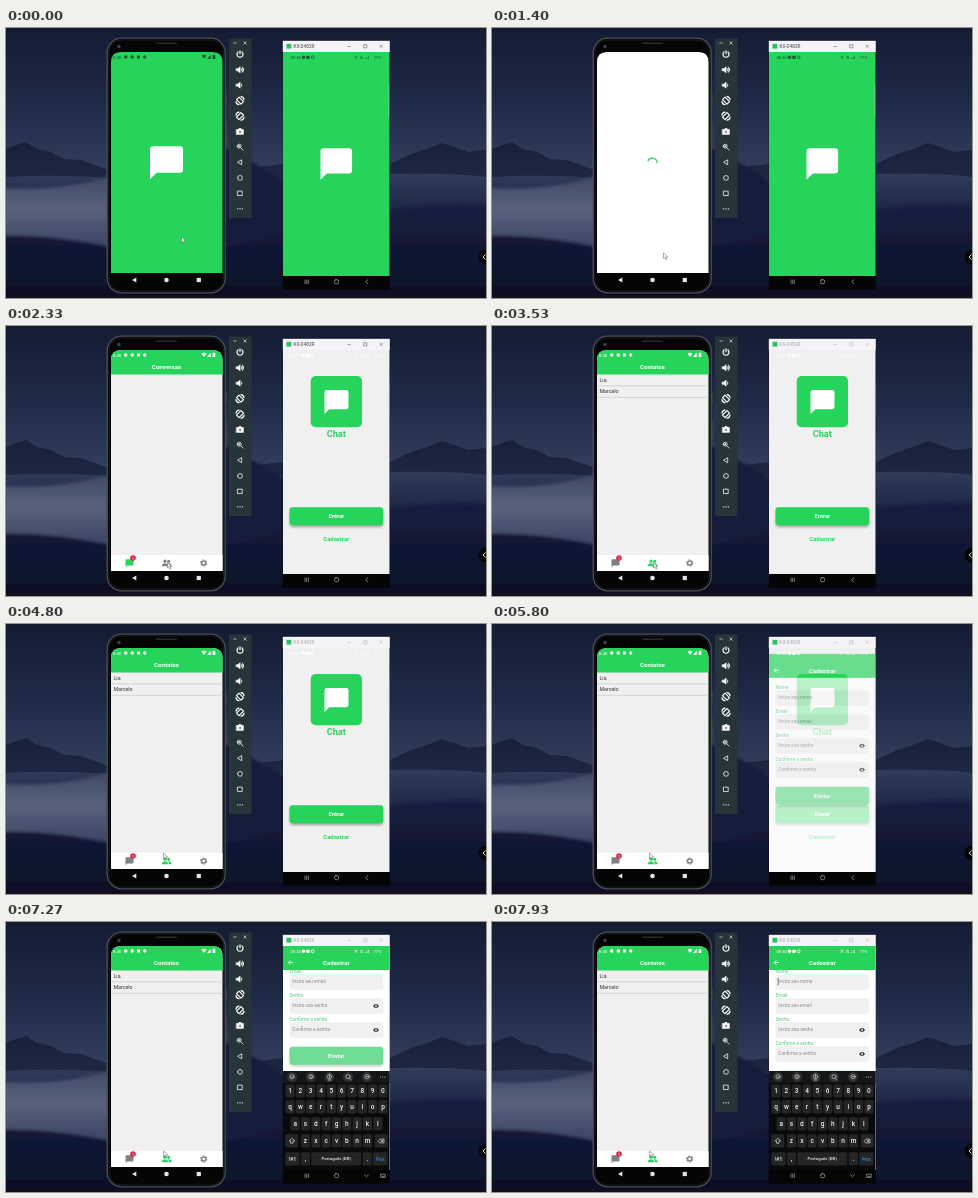
Recreate the animation shown at these times as an HTML page. Size 480 px wide and 270 px high, loop 8 s.

```html
<!DOCTYPE html>
<html lang="pt-BR">
<head>
<meta charset="utf-8">
<title>Chat em dois aparelhos</title>
<style>
html, body { margin: 0; width: 100%; height: 100%; overflow: hidden; background: #0d1428; }
svg { display: block; width: 480px; height: 270px; font-family: Roboto, "Open Sans", sans-serif; }
.b { font-weight: 700; }
.mid { text-anchor: middle; }
.g { fill: #27d45b; }
.w { fill: #fff; }
.line { fill: none; stroke: #fff; stroke-linejoin: round; stroke-linecap: round; }
</style>
</head>
<body>
<svg viewBox="0 0 480 270">
  <defs>
    <linearGradient id="sky" x2="0" y2="1">
      <stop offset="0" stop-color="#141c33"/><stop offset=".5" stop-color="#1f2a47"/><stop offset="1" stop-color="#34405f"/>
    </linearGradient>
    <linearGradient id="far" x2="0" y2="1">
      <stop offset="0" stop-color="#18213a"/><stop offset="1" stop-color="#222d4a"/>
    </linearGradient>
    <linearGradient id="plain" gradientUnits="userSpaceOnUse" x1="0" x2="0" y1="145" y2="215">
      <stop offset="0" stop-color="#313c5b"/><stop offset=".4" stop-color="#222c4b"/><stop offset="1" stop-color="#11183a"/>
    </linearGradient>
    <linearGradient id="lit" gradientUnits="userSpaceOnUse" x1="0" x2="0" y1="145" y2="218">
      <stop offset="0" stop-color="#3b4663"/><stop offset=".5" stop-color="#59627d"/><stop offset="1" stop-color="#3a4463"/>
    </linearGradient>
    <linearGradient id="near" x2="0" y2="1">
      <stop offset="0" stop-color="#161e40"/><stop offset="1" stop-color="#0a0e22"/>
    </linearGradient>
    <filter id="soft"><feGaussianBlur stdDeviation="1.4"/></filter>
    <clipPath id="screenL"><path d="M105 245V34q0-10 10-10h91.500q10 0 10 10v211z"/></clipPath>
    <clipPath id="screenR"><rect x="277" y="24" width="106.500" height="224"/></clipPath>
    <clipPath id="formClip"><rect x="277" y="48" width="106.500" height="200"/></clipPath>
    <path id="bubble" d="M18 0H2Q0 0 0 2V20l4-4H18q2 0 2-2V2q0-2-2-2z"/>
    <g id="eye"><path d="M-3 0Q0-4 3 0Q0 4-3 0z" fill="#222"/><circle r="1.200" fill="#f0f0f0"/><circle r=".6" fill="#222"/></g>
  </defs>

  <g id="wallpaper">
    <rect width="480" height="150" fill="url(#sky)"/>
    <path d="M0 121L10 117L20 114L31 121L45 124L58 131L75 132L100 141L250 139L278 136L384 136L405 126L421 121L436 115L448 119L462 124L480 122V180H0z" fill="url(#far)"/>
    <path d="M0 149Q50 146 105 150H276Q430 142 480 149V270H0z" fill="url(#plain)"/>
    <g filter="url(#soft)">
      <path d="M-5 160Q55 164 105 148L190 108Q205 160 170 225H-5z" fill="url(#lit)"/>
      <path d="M190 108Q230 122 290 160V270H165Q205 160 190 108z" fill="#151d3a"/>
      <path d="M-5 208Q45 206 110 220Q200 230 276 205Q380 172 490 178V280H-5z" fill="url(#near)"/>
    </g>
    <rect y="267" width="480" height="3" fill="#150d1c"/>
    <circle cx="480" cy="229" r="7.500" fill="#050505"/>
    <path d="M479.500 226.500l-2.500 2.500l2.500 2.500" fill="none" stroke="#e6dca0"/>
  </g>

  <g id="phone">
    <rect x="218" y="66" width="2.600" height="13" rx="1" fill="#444"/>
    <rect x="218" y="94" width="2.600" height="27" rx="1" fill="#444"/>
    <rect x="101.200" y="10.200" width="118" height="254.600" rx="14.500" fill="#050506" stroke="#4c4f55" stroke-width="1.300"/>
    <rect x="103" y="12" width="114.500" height="251" rx="12.500" fill="none" stroke="#1b1c20"/>
    <rect x="150" y="14.500" width="21" height="1.500" rx=".7" fill="#292a2e"/>
    <circle cx="113" cy="18.500" r="1.800" fill="#39404d"/>
    <g fill="#e4e4e4">
      <path d="M130.300 249.600v4.800l-4.300-2.400z"/>
      <circle cx="160.500" cy="252" r="2.300"/>
      <rect x="190.700" y="249.900" width="4.200" height="4.200"/>
    </g>
  </g>

  <g clip-path="url(#screenL)">
    <rect x="105" y="24" width="112" height="221" id="baseL"/>
    <g id="splashL"><use href="#bubble" class="w" transform="translate(144 118.300) scale(1.650)"/></g>
    <path id="spinner" d="M155.800 133A5 5 0 0 1 165.300 135.300" fill="none" stroke="#27d45b" stroke-width="1.200"/>
    <g id="home">
      <rect x="105" y="24" width="112" height="24.500" class="g"/>
      <text id="titleL" x="160.500" y="43" class="w b mid" font-size="6.200"></text>
      <g id="list" font-size="5.300" fill="#333"></g>
      <rect x="105" y="229" width="112" height="16" fill="#fff"/>
      <use id="tabChat" href="#bubble" transform="translate(119.500 233.200) scale(.4)"/>
      <g id="badge"><circle cx="127" cy="232" r="2.800" fill="#dc2448"/><text x="127" y="233.600" class="w mid" font-size="4.300">1</text></g>
      <g id="tabPeople"><circle cx="159" cy="235.200" r="1.600"/><circle cx="162.800" cy="235.200" r="1.500"/><path d="M155.800 240.300v-1q1-2 3.200-2t3.200 2v1zM162.800 240.300v-1.200l-.8-1.700q2.600-.4 3.500 1.600v1.300z"/></g>
      <g fill="none" stroke="#858585"><circle cx="197.700" cy="237" r="2.100" stroke-width="1.500"/><circle cx="197.700" cy="237" r="3.200" stroke-width="1" stroke-dasharray="1.700 1.651"/></g>
    </g>
    <g id="statusL">
      <text x="107" y="30.500" font-size="4.300">8:40</text>
      <path d="M118 29a1.700 1.700 0 1 0 3.400 0a1.700 1.700 0 1 0-3.400 0M124.500 29a1.700 1.700 0 1 0 3.400 0a1.700 1.700 0 1 0-3.400 0M131 27.500h2.800v3.100h-2.800zM136.800 29l1.900-1.900l1.900 1.900l-1.900 1.900zM195.500 27.800q2.500-2 5 0l-2.500 3zM204.700 26.700v4.200h-3.700zM206.500 27.200h.8v-.6h1.200v.6h.8v3.900h-2.800z"/>
    </g>
  </g>

  <g id="tools">
    <rect x="223" y="10.500" width="22.500" height="179.500" fill="#27343a"/>
    <path d="M227.800 15h2.400M237.800 13.800l2.400 2.400M240.200 13.800l-2.400 2.400" class="line" stroke-width=".6"/>
  </g>

  <g id="window">
    <rect x="276.800" y="12.800" width="107" height="248.700" fill="#050505"/>
    <rect x="276.800" y="12.800" width="107" height="11.200" fill="#f6f3f8"/>
    <rect x="280.500" y="15.800" width="4.800" height="4.800" fill="#27c45a"/>
    <g id="caption"><text x="287.500" y="20.300" font-size="4.700">KX-D482R</text>
      <path d="M341.700 18.500h3M357.700 16.700h3.200v3.200h-3.200zM373.700 16.800l3 3M376.700 16.800l-3 3" fill="none" stroke="currentColor" stroke-width=".5"/></g>
  </g>
  <g clip-path="url(#screenR)">
    <rect x="277" y="24" width="107" height="224" id="baseR"/>
    <g id="splashR"><use href="#bubble" class="w" transform="translate(314.500 120.200) scale(1.580)"/></g>
    <g id="login">
      <rect x="304.700" y="50" width="51.300" height="51.300" rx="5" class="g"/>
      <use href="#bubble" class="w" transform="translate(318.500 64) scale(1.200)"/>
      <text x="330.300" y="111" class="g b mid" font-size="9.200">Chat</text>
      <rect x="284" y="183" width="93" height="18" rx="3" opacity=".35" filter="url(#soft)"/>
      <rect x="283.500" y="181.300" width="93.700" height="18" rx="3" class="g"/>
      <text x="330.300" y="192.400" class="w b mid" font-size="5.800">Entrar</text>
      <text id="signUp" x="330.300" y="215" class="g b mid" font-size="5.900">Cadastrar</text>
    </g>
    <g id="register">
      <rect x="277" y="24" width="107" height="224" fill="#fff"/>
      <g clip-path="url(#formClip)"><g id="form"></g></g>
      <rect x="277" y="24" width="107" height="24" class="g"/>
      <path d="M286.500 40.500h-4.200M284.200 38.500l-2 2l2 2" class="line" stroke-width=".8"/>
      <text x="330.300" y="42.800" class="w b mid" font-size="6.100">Cadastrar</text>
    </g>
    <g id="statusR">
      <text x="284.500" y="30.800" font-size="4.200">08:40</text>
      <circle cx="297.500" cy="29.300" r="1.700"/>
      <rect x="300.300" y="27.700" width="3.300" height="3.200" rx=".6"/>
      <circle cx="306.700" cy="29.300" r="1.400" fill="none" stroke="currentColor" stroke-width=".8"/>
      <path d="M348.500 27.700l3 3M351.500 27.700l-3 3M354 29.300q1.500-2 3 0M354 30.700q1.500-1.500 3 0M359.500 31v-1M361 31v-2M362.500 31v-3.300" fill="none" stroke="currentColor" stroke-width=".6"/>
      <text x="367.500" y="30.800" font-size="4.200">77%</text>
    </g>
    <path d="M383 57v33" stroke="#d8d8d8" stroke-width=".7" opacity=".6"/>
    <g id="keyboard"></g>
  </g>
  <g class="line" stroke-width=".7" style="stroke:#a8a8a8">
    <path d="M299 252v3.500M300.700 252v3.500M302.400 252v3.500"/>
    <rect x="328.600" y="251.700" width="4" height="4" rx="1.300"/>
    <path id="navBack" d="M361.800 251.700l-2.200 2l2.200 2"/>
    <path id="navDown" d="M358.500 252.700l2 2l2-2M375 252.200h4.200v3.200h-4.200zM376.200 254.300h1.800"/>
  </g>
  <path id="pointer" d="M0 0v5.500l1.400-1.200l1 2.200l1-.5l-1-2.100h1.800z" fill="#fff" stroke="#555" stroke-width=".5"/>
</svg>
<script>
const LOOP = 8000, GREEN = '#27d45b', GREY = '#808080';
const $ = id => document.getElementById(id);
const text = (x, y, size, fill, str, extra = '') =>
  `<text x="${x}" y="${y}" font-size="${size}" fill="${fill}" ${extra}>${str}</text>`;
const rect = (x, y, w, h, fill, r = 0) =>
  `<rect x="${x}" y="${y}" width="${w}" height="${h}" rx="${r}" fill="${fill}"/>`;

// Emulator side bar: one outline per button, centred on its own origin.
const speaker = 'M-3.500-1h1.500l2-2v6l-2-2h-1.500z';
const tools = [
  'M0-3.500v3M-2-2.300a3 3 0 1 0 4 0',
  speaker + 'M1.500-1.300q1 1.300 0 2.600M2.500-2.700q2.500 2.700 0 5.400',
  speaker + 'M1.500-1.300q1 1.300 0 2.600',
  'M-3.500-1l2.500-2.500l4.500 4.500l-2.500 2.500zM-4 1q.3 2.700 3 3M1-4q2.500.3 3 3',
  'M3.500-1l-2.500-2.500l-4.500 4.500l2.500 2.500zM4 1q-.3 2.700-3 3M-1-4q-2.500.3-3 3',
  'M-3.300-2h1.500l.8-1h2l.8 1h1.500v4.800h-6.600zM-1.300.4a1.300 1.300 0 1 0 2.600 0a1.300 1.300 0 1 0-2.600 0',
  'M-2.800-.8a2 2 0 1 0 4 0a2 2 0 1 0-4 0M.8.8l2.300 2.300M-1.600-.8h1.600M-.8-1.600v1.600',
  'M1.700-2.300v4.600l-3.800-2.300z', 'M-2.400 0a2.400 2.400 0 1 0 4.800 0a2.400 2.400 0 1 0-4.800 0',
  'M-2.200-2.200h4.400v4.400h-4.400z', 'M-2.300 0h.1M0 0h.1M2.300 0h.1'
];
const solid = [1, 2, 5], heavy = [0, 3, 4, 10];
$('tools').innerHTML += tools.map((d, i) =>
  `<path class="line" d="${d}" transform="translate(234 ${26.300 + i * 15.450})" fill-rule="evenodd"
    stroke-width="${heavy.includes(i) ? 1.200 : .75}" ${solid.includes(i) ? 'style="fill:#fff"' : ''}/>`).join('');

$('list').innerHTML = ['Lia', 'Marcelo'].map((name, i) =>
  `<text x="107.500" y="${55.800 + i * 11.300}">${name}</text>` + rect(105, 59.600 + i * 11.300, 112, .6, '#c4c4c4')).join('');

const fields = [['Nome', 'Insira seu nome'], ['Email', 'Insira seu email'],
  ['Senha', 'Insira sua senha'], ['Confirme a senha', 'Confirme a senha']];
$('form').innerHTML = fields.map(([label, hint], i) => {
  const y = 24 * i;
  return text(283.500, y + 58.700, 4.800, '#4cc978', label) + rect(283.500, y + 60.300, 93.700, 15.400, '#f0f0f0', 2) +
    text(286.300, y + 69.400, 4.800, '#8a8a8a', hint) +
    (i > 1 ? `<use href="#eye" x="370" y="${y + 68}"/>` : '');
}).join('') + '<rect id="caret" x="285.800" y="64" width=".6" height="7.500" fill="#333"/>' +
  '<rect x="284" y="158.500" width="93" height="18" rx="3" opacity=".2" filter="url(#soft)"/>' +
  rect(283.500, 156.800, 93.700, 18, '#71dd94', 3) +
  text(330.300, 168, 5.900, '#fff', 'Enviar', 'class="b mid"');

function buildKeyboard() {
  const key = (x, y, w, label, size = 6.500, fill = '#eee') =>
    rect(x - w / 2, y - 6.800, w, 13.400, '#242527', 1.800) + text(x, y + size * .34, size, fill, label, 'class="mid" font-weight="500"');
  const row = (chars, x, y) => [...chars].map((c, i) => key(x + i * 10.330, y, 9.200, c)).join('');
  const glyphs = ['M285 155q1 1.300 2 0', 'M305 153.500v2.500', 'M323.500 152v4M322 158h3', 'M343.500 156.300l1.800 1.700', 'M360 154.700h3.500'];
  let out = rect(277, 149, 107, 99, '#090a0b') + rect(277, 149, 107, 12, '#141618');
  out += [286, 305, 323.500, 342, 361].map((x, i) => `<circle cx="${x}" cy="155" r="5" fill="#303234"/>` +
    `<g class="line" stroke-width=".7" style="stroke:#c8c8c8"><circle cx="${x}" cy="154.700" r="2.100"/><path d="${glyphs[i]}"/></g>`).join('');
  out += [374.500, 376.700, 378.900].map(x => `<circle cx="${x}" cy="155" r=".6" fill="#ccc"/>`).join('');
  out += row('1234567890', 284, 169) + row('qwertyuiop', 284, 184.900) + row('asdfghjkl', 289.200, 202) + row('zxcvbnm', 299.500, 219);
  out += key(285.700, 219, 13, '') + key(375.200, 219, 13, '') +
    '<path class="line" stroke-width=".6" d="M285.700 216.500l-2.500 2.500h1.300v2.200h2.400v-2.200h1.300zM372.300 219l1.700-1.900h4v3.800h-4zM375.200 218.200l1.600 1.600M376.800 218.200l-1.600 1.600"/>';
  out += key(286.500, 237, 14.500, '!#1', 5.500) + key(299.500, 237, 9.200, ',') + key(330.300, 237, 50, 'Português (BR)', 4.300) +
    key(361.300, 237, 9.200, '.') + key(374.300, 237, 14.500, 'Próx', 4.500, '#3a7fd0');
  $('keyboard').innerHTML = out;
}
buildKeyboard();

const ease = p => p * p * (3 - 2 * p);
// Eased value at t from rows of [time, ...values].
function track(rows, t) {
  const i = rows.findIndex(r => r[0] > t);
  if (i < 0) return rows[rows.length - 1].slice(1);
  if (i === 0) return rows[0].slice(1);
  const a = rows[i - 1], b = rows[i], p = ease((t - a[0]) / (b[0] - a[0]));
  return a.slice(1).map((v, k) => v + (b[k + 1] - v) * p);
}
const POINTER = [[70, 175.500, 209], [870, 171.500, 225], [2070, 171.500, 225], [2330, 161.500, 236.500], [3730, 161.500, 236.500], [4200, 157.500, 229]];
const SCROLL = [[6500, 0], [7250, 32], [7370, 32], [7930, 8]];
const PRESS = [[5370, 1], [5430, .3], [5530, .3], [5660, 1]];
const PAGE = [[5640, 0], [5900, 1]];
const KEYS = [[5960, 112], [6250, 0]];

const show = (id, on) => $(id).style.display = on ? '' : 'none';
const paint = (id, c) => { $(id).style.fill = c; $(id).style.color = c; };
const move = (id, x, y) => $(id).setAttribute('transform', `translate(${x} ${y})`);

function draw(t) {
  const loading = t >= 470, home = t >= 1670, contacts = t >= 3130, login = t >= 1600;
  paint('baseL', home ? '#f0f0f0' : loading ? '#fff' : GREEN);
  show('splashL', !loading);
  show('spinner', loading && !home);
  $('spinner').setAttribute('transform', `rotate(${(t - 1400) * .36} 160.500 134.300)`);
  show('home', home);
  show('badge', t >= 1800);
  show('list', t >= 3400);
  $('titleL').textContent = contacts ? 'Contatos' : 'Conversas';
  paint('tabChat', contacts ? GREY : GREEN);
  paint('tabPeople', contacts ? GREEN : GREY);
  paint('statusL', loading ? '#fff' : '#14592d');

  paint('caption', t >= 3070 ? '#a8a8a8' : '#444');
  paint('baseR', login ? '#f0f0f0' : GREEN);
  paint('statusR', login ? '#fff' : '#1b5a30');
  show('splashR', !login);
  show('login', login);
  $('signUp').style.opacity = track(PRESS, t)[0];

  const page = track(PAGE, t)[0], drop = track(KEYS, t)[0];
  show('register', page > 0);
  $('register').style.opacity = page;
  move('register', 0, 18 * (1 - page));
  move('form', 0, -track(SCROLL, t)[0]);
  show('caret', t >= 5960 && (t + 300) % 1000 < 500);
  show('keyboard', drop < 112);
  move('keyboard', 0, drop);
  show('navBack', drop > 60);
  show('navDown', drop <= 60);
  move('pointer', ...track(POINTER, t));
}

const start = performance.now();
function frame() {
  draw((performance.now() - start) % LOOP);
  requestAnimationFrame(frame);
}
frame();
</script>
</body>
</html>
```
